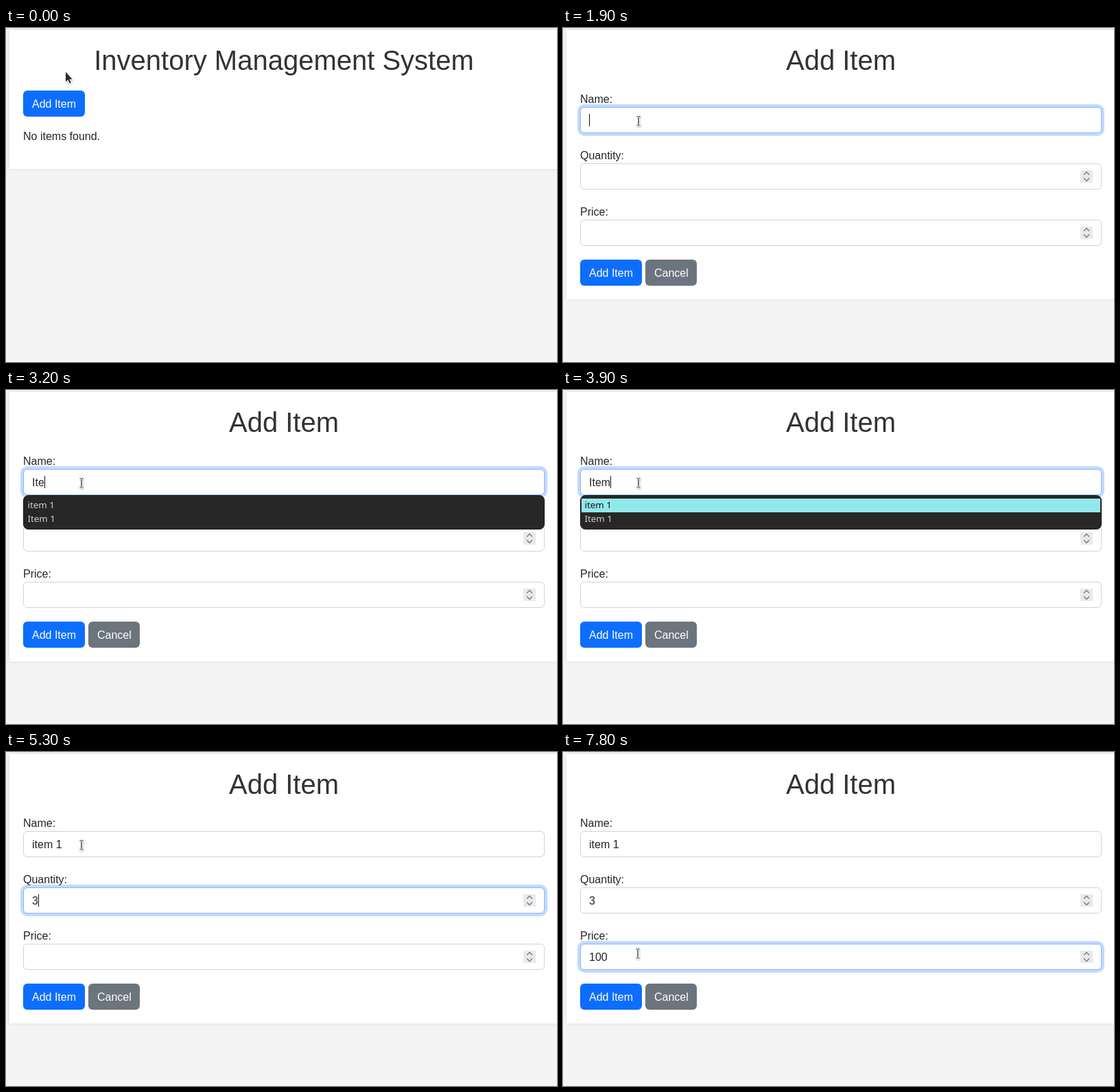
An HTML page that plays this animation: 803 by 486 pixels, repeating every 8000 ms.

```html
<!DOCTYPE html>
<html lang="en">
<head>
<meta charset="utf-8">
<title>Inventory Management System</title>
<style>
  html, body { margin: 0; width: 100%; height: 100%; overflow: hidden; background: #f4f4f4; }
  svg { display: block; width: 803px; height: 486px; }
  text { font: 16px "Liberation Sans", Arial, sans-serif; fill: #212529; white-space: pre; }
  .title { font-size: 40px; fill: #333; text-anchor: middle; }
  .btn text { fill: #fff; }
  .menu text { font: 13.33px "Noto Sans", sans-serif; fill: #cfcfcf; }
</style>
</head>
<body>
<svg id="stage" viewBox="0 0 803 486" xmlns="http://www.w3.org/2000/svg">
  <defs>
    <filter id="soft" x="-5%" y="-10%" width="110%" height="120%">
      <feDropShadow dx="0" dy="0" stdDeviation="2.5" flood-color="#000" flood-opacity=".1"/>
    </filter>
    <filter id="shade" x="-50%" y="-50%" width="200%" height="200%">
      <feDropShadow dx=".5" dy="1" stdDeviation=".8" flood-color="#000" flood-opacity=".35"/>
    </filter>
  </defs>
  <rect width="803" height="486" fill="#f4f4f4"/>
  <rect id="card" x="5" y="3" width="800" height="202" fill="#fff" filter="url(#soft)"/>
  <g id="list"><text class="title" x="405" y="61">Inventory Management System</text><text x="25" y="163">No items found.</text></g>
  <g id="form"><text class="title" x="405" y="61">Add Item</text></g>
  <g id="menu" class="menu">
    <rect id="panel" x="25.5" y="153.5" width="759" height="49" rx="7" fill="#272727" stroke="#1b1b1b"/>
    <rect id="mark" x="27" y="158" width="756" height="20" fill="#91e8eb"/>
    <text id="first" x="31.5" y="172">item 1</text>
    <text x="31.5" y="192">Item 1</text>
  </g>
  <g id="pointer" filter="url(#shade)">
    <path id="arrow" d="M0 0V14.2L3.3 11.2L5.6 16.4L7.8 15.4L5.5 10.4H9.6Z" fill="#2b2b2b" stroke="#fff" stroke-width="1.6" paint-order="stroke"/>
    <path id="hand" d="M-1 1Q0-1 1 1V7L7 8Q8 9 8 12L6 17H-1L-5 11Q-5 9-3 10L-1 12Z" fill="#2b2b2b" stroke="#fff" stroke-width="1.6" paint-order="stroke"/>
    <g id="beam" fill="none">
      <path d="M-2.5-6.5H2.5M0-6.5V7M-2.5 7H2.5" stroke="#fff" stroke-width="3"/>
      <path d="M-2.5-6.5H-.7M.7-6.5H2.5M0-6V6.5M-2.5 7H-.7M.7 7H2.5" stroke="#222" stroke-width="1.2"/>
    </g>
  </g>
</svg>
<script>
const LOOP = 8000, STEP = 100;
const $ = id => document.getElementById(id);

function add(parent, tag, attrs, label) {
  const el = document.createElementNS("http://www.w3.org/2000/svg", tag);
  set(el, attrs);
  if (label) el.textContent = label;
  return parent.appendChild(el);
}
function set(el, attrs) {
  for (const key in attrs) el.setAttribute(key, attrs[key]);
}
const show = (el, on) => set(el, { visibility: on ? "visible" : "hidden" });

function button(parent, x, y, w, label, fill) {
  const g = add(parent, "g", { class: "btn" });
  const box = add(g, "rect", { x, y, width: w, height: 38, rx: 6, fill });
  add(g, "text", { x: x + 13, y: y + 25 }, label);
  return box;
}

function field(label, y, spinner) {
  const form = $("form");
  add(form, "text", { x: 25, y: y - 6 }, label);
  const ring = add(form, "rect", { fill: "#0d6efd" });
  const box = add(form, "rect", { x: 25.5, y: y + .5, width: 759, height: 37, rx: 5.5, fill: "#fff" });
  const text = add(form, "text", { x: 38, y: y + 25 });
  const caret = add(form, "rect", { y: y + 10, width: 1, height: 18, fill: "#111" });
  if (spinner) {
    add(form, "rect", { x: 754, y: y + 10, width: 18, height: 18, fill: "#e9e9ed" });
    add(form, "path", {
      d: `M759 ${y + 16.5}l4-4l4 4M759 ${y + 21.5}l4 4l4-4`,
      fill: "none", stroke: "#77777c", "stroke-width": 1.3
    });
  }
  return { y, ring, box, text, caret };
}

const addButton = button($("list"), 25, 91, 90, "Add Item", "#0d6efd");
const fields = [field("Name:", 115), field("Quantity:", 197, true), field("Price:", 279, true)];
button($("form"), 25, 337, 90, "Add Item", "#0d6efd");
button($("form"), 120, 337, 75, "Cancel", "#6c757d");

// Last entry whose time has passed
const at = (keys, t) => keys.reduce((value, k) => t >= k[0] ? k[1] : value, "");

const typed = [
  [[2900, "I"], [3100, "It"], [3200, "Ite"], [3300, "Item"], [4100, "item 1"]],
  [[5300, "3"]],
  [[7500, "1"], [7600, "10"], [7800, "100"]]
];
const focusStart = [1740, 4555, 6620, Infinity];
const caretField = [[0, -1], [1800, 0], [4600, 1], [6600, 2]];
const caretOff = [[3000, 3100], [5800, 6300], [7800, 8000]];
const route = [
  [300, 87, 64], [400, 87, 70], [600, 90, 97], [700, 92, 104], [900, 93, 108],
  [1400, 93, 108], [1700, 110, 135], [5800, 110, 135], [5900, 110, 136],
  [6000, 110, 136], [6100, 110, 162], [6200, 108, 216], [6300, 108, 285],
  [6400, 108, 285], [6500, 109, 293]
];

function place(t) {
  const i = route.findIndex(k => k[0] > t);
  if (i === 0) return route[0].slice(1);
  if (i < 0) return route[route.length - 1].slice(1);
  const [t0, x0, y0] = route[i - 1], [t1, x1, y1] = route[i];
  const p = (t - t0) / (t1 - t0);
  return [x0 + (x1 - x0) * p, y0 + (y1 - y0) * p];
}

function ramp(t, start) {
  const p = Math.min(1, Math.max(0, (t - start) / 150));
  return p * p * (3 - 2 * p);
}

function mix(a, b, p) {
  return `rgb(${a.map((v, i) => Math.round(v + (b[i] - v) * p))})`;
}

function drawField(f, i, t) {
  const focus = ramp(t, focusStart[i]) - ramp(t, focusStart[i + 1]);
  const grow = 4 * focus;
  set(f.ring, {
    x: 25 - grow, y: f.y - grow, width: 760 + 2 * grow, height: 38 + 2 * grow,
    rx: 6 + grow, opacity: .25 * focus
  });
  set(f.box, { stroke: mix([206, 212, 218], [134, 183, 254], focus) });
  const value = at(typed[i], t);
  if (f.text.textContent !== value) f.text.textContent = value;
  const on = at(caretField, t) === i && !caretOff.some(([a, b]) => t >= a && t < b);
  show(f.caret, on);
  if (on) set(f.caret, { x: 38 + (value ? Math.round(f.text.getComputedTextLength()) : 0) });
}

function draw(time) {
  const t = Math.floor((time % LOOP) / STEP) * STEP;
  const onForm = t >= 1000;
  $("list").style.display = onForm ? "none" : "";
  $("form").style.display = onForm ? "" : "none";
  set($("card"), { height: onForm ? 392 : 202 });
  set(addButton, { fill: t >= 800 ? "#0a58ca" : mix([13, 110, 253], [11, 94, 215], ramp(t, 530)) });
  if (onForm) fields.forEach((f, i) => drawField(f, i, t));
  else fields.forEach(f => show(f.caret, false));

  $("menu").style.display = t >= 2900 && t < 4200 ? "" : "none";
  set($("panel"), { height: t < 3000 ? 70 : 49 });
  const marked = t >= 3900;
  show($("mark"), marked);
  $("first").style.fill = marked ? "#111" : "";

  const [x, y] = place(t);
  const overField = onForm && fields.some(f => y >= f.y && y < f.y + 38);
  const overButton = t < 1100 && y >= 91;
  set($("pointer"), { transform: `translate(${x} ${y})` });
  show($("beam"), overField);
  show($("hand"), overButton);
  show($("arrow"), !overField && !overButton);
}

const start = performance.now();
function tick(now) {
  draw(Math.max(0, now - start));
  requestAnimationFrame(tick);
}
draw(0);
requestAnimationFrame(tick);
</script>
</body>
</html>
```
